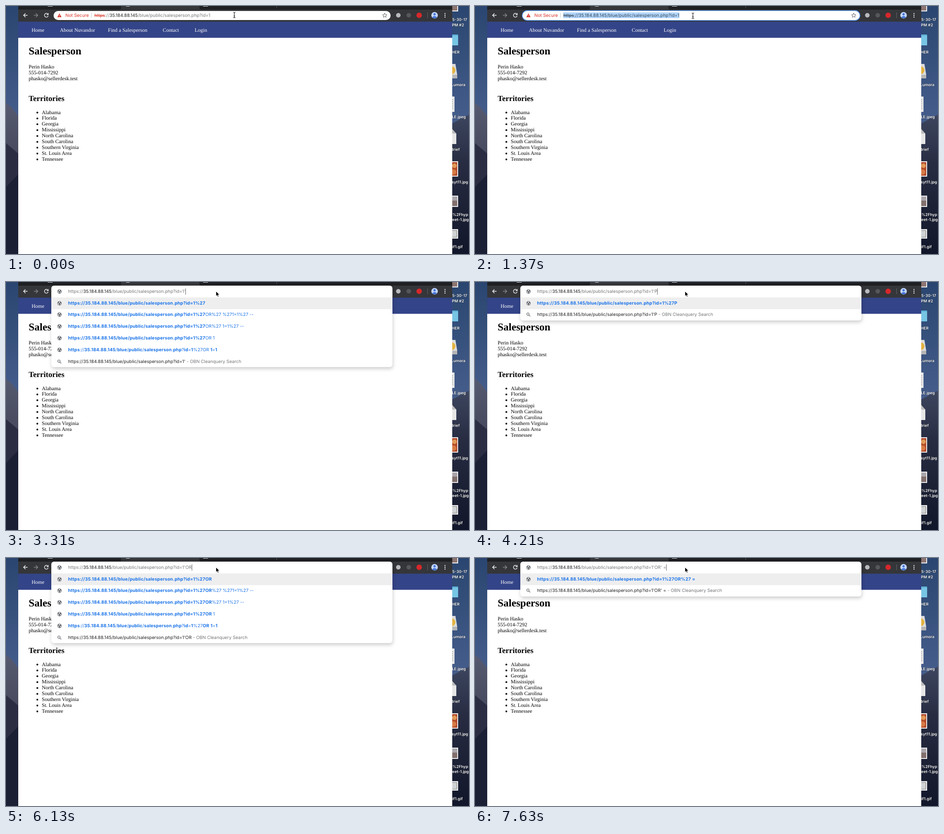
Animation of 1022x548 px, one loop 8000 ms. Source, as an HTML page:

```html
<!DOCTYPE html>
<html lang="en">
<head>
<meta charset="utf-8">
<title>Salesperson lookup</title>
<style>
html, body { margin: 0; width: 100%; height: 100%; overflow: hidden; background: #fff; }
#stage { position: relative; width: 1022px; height: 548px; overflow: hidden; text-rendering: geometricPrecision; }
#stage > svg { position: absolute; left: 0; top: 0; }
.serif { font: 11.5px "Liberation Serif", serif; }
.label { font: 600 8.6px Inter, sans-serif; fill: #fff; text-anchor: end; paint-order: stroke; stroke: #0006; stroke-width: 1px; }
.line { position: absolute; height: 20px; font: 9.86px/20px Inter, sans-serif; white-space: pre; color: #757679; }
.line b { font-weight: 700; letter-spacing: .18px; }
.host { color: #202124; }
.bad { color: #d93025; text-decoration: line-through; }
.caret { border-left: 1px solid #666; margin-right: -1px; padding: 1px 0; }
.caret.off { border-color: transparent; }
#pill { position: absolute; left: 105px; top: 11px; width: 744px; height: 20px; border-radius: 10px; background: #fff; }
#pill.ring { box-shadow: 0 0 0 1.4px #5b9bf3; }
#pill .line { top: -.2px; }
#url.sel { background: linear-gradient(#b3d7ff, #b3d7ff) 0 3px / 100% 13px no-repeat; }
#url.sel, #url.sel * { color: #35424f; }
#drop { position: absolute; left: 100px; top: 8px; width: 753px; border-radius: 6px; background: #fff; box-shadow: 1px 4px 8px #0003; }
#drop .hot { position: absolute; left: 0; top: 25.8px; width: 100%; height: 25.8px; background: #eeeeef; }
#drop .line { left: 37px; color: #1a73e8; }
#drop .line.dark { color: #202124; }
#drop .line.input, #drop i { color: #757679; font-style: normal; }
#drop svg { position: absolute; left: 12px; }
</style>
</head>
<body>
<div id="stage">
<svg id="scene" width="1022" height="548">
  <defs>
    <linearGradient id="sky" x2="0" y2="1">
      <stop stop-color="#2a4670"/><stop offset="1" stop-color="#4a6190"/>
    </linearGradient>
    <linearGradient id="ridge" x2="0" y2="1">
      <stop stop-color="#565a70"/><stop offset="1" stop-color="#44475b"/>
    </linearGradient>
    <linearGradient id="dune" x2="0" y2="1">
      <stop stop-color="#3d465f"/><stop offset=".35" stop-color="#272c42"/><stop offset="1" stop-color="#11162a"/>
    </linearGradient>
    <symbol id="globe" viewBox="-6 -6 12 12">
      <circle r="4.7" fill="#5f6368"/>
      <path d="M-3.8-1.2L-1.6.8-.8 3.8C-3 3-4 1-3.8-1.2ZM-.6-3.8L2-3.2.8-1.4-1-.8-1.6-2.2ZM1 .2L3.6.2 2.6 2.6 1.4 2.8Z" fill="#fff"/>
    </symbol>
    <symbol id="lens" viewBox="-6 -6 12 12">
      <path d="M.9.9L4 4M1.5-1.1a2.6 2.6 0 1 1-5.2 0a2.6 2.6 0 1 1 5.2 0" fill="none" stroke="#5f6368" stroke-width="1.1"/>
    </symbol>
  </defs>
  <rect width="1022" height="300" fill="url(#sky)"/>
  <path d="M0 214L12 224 27 243V350H0Z" fill="url(#ridge)"/>
  <path d="M0 303L27 326V548H0Z" fill="#2b2e43"/>
  <path d="M0 400L27 372V548H0Z" fill="#1c2035"/>
  <path d="M980 262L1022 240V548H980Z" fill="url(#dune)"/>
  <g id="desktop">
    <rect x="975" y="-12" width="23" height="24" fill="#eee"/><rect x="975" y="-12" width="21" height="22" fill="#8d7572"/>
    <rect x="970" y="63" width="28" height="24" rx="1" fill="#5fb4d8"/><rect x="970" y="66" width="28" height="21" fill="#77c5e4"/>
    <path d="M970 128H992L996 152V160H970Z" fill="#dcdcdc"/><rect x="970" y="152" width="26" height="8" fill="#b5b5b5"/>
    <circle cx="983" cy="142" r="9" fill="#e3b341"/>
    <rect x="970" y="200" width="20" height="34" fill="#e9e9e9"/><path d="M986 206V228" stroke="#aaa" stroke-width="2" stroke-dasharray="2 2"/>
    <path d="M970 272H985L994 282V305H970Z" fill="#e6e6e6"/><path d="M985 272V282H994Z" fill="#bbb"/>
    <rect x="970" y="343" width="28" height="34" fill="#eee"/><rect x="970" y="345" width="26" height="30" fill="#b34a2a"/>
    <circle cx="990" cy="353" r="5" fill="#e09a58"/><circle cx="988" cy="367" r="6" fill="#d77b46"/>
    <rect x="970" y="419" width="28" height="25" fill="#eee"/><rect x="970" y="421" width="26" height="21" fill="#82706e"/><rect x="970" y="421" width="26" height="9" fill="#a9a5ab"/>
    <rect x="970" y="493" width="28" height="21" fill="#eee"/><rect x="970" y="496" width="25" height="15" fill="#d0d2d4" stroke="#777"/>
  </g>
  <rect x="27" width="958" height="548" fill="#fff"/>
  <rect x="27" width="958" height="9" fill="#1f2023"/>
  <path d="M250 8Q254 8 254 4V0H427V4Q427 8 431 8Z" fill="#35363a"/>
  <path d="M597.5 0V4" stroke="#4b4c50"/>
  <path d="M92 .5H103M265 .5H273M435 .5H446" stroke="#ddd"/>
  <rect x="27" y="8" width="958" height="27" fill="#35363a"/>
  <rect x="27" y="34.600" width="958" height="35.700" fill="#334488"/>
  <g fill="none" stroke="#f1f3f4" stroke-width="1.4">
    <path d="M47.5 20.5H39M43 16.3L38.8 20.5 43 24.7"/>
    <path d="M61.5 20.5H70M66 16.3L70.2 20.5 66 24.7" stroke="#85868a"/>
    <path d="M92.2 17.6A4.2 4.2 0 1 0 93.1 21.7M93.2 15.8V19.3H89.7"/>
  </g>
  <circle cx="866" cy="20.5" r="5" fill="#b9babd"/>
  <circle cx="889" cy="20.5" r="5" fill="#55575a"/>
  <circle cx="912" cy="20.5" r="6" fill="#d6282b"/>
  <path d="M930.5 14V27" stroke="#606266"/>
  <circle cx="946" cy="20.5" r="7.2" fill="#c3d6fb"/>
  <circle cx="946" cy="18.2" r="2.5" fill="#4272d7"/><path d="M940.8 25Q946 19.5 951.2 25Q946 29.5 940.8 25Z" fill="#4272d7"/>
  <g fill="#f1f3f4"><circle cx="969" cy="16.6" r="1.2"/><circle cx="969" cy="20.5" r="1.2"/><circle cx="969" cy="24.4" r="1.2"/></g>
</svg>
<div id="pill">
  <svg width="744" height="20">
    <path d="M13 5.3L17.6 13.8H8.4Z" fill="#d93025"/><path d="M13 8.3V11M13 11.8V12.9" stroke="#fff"/>
    <path d="M83.5 4V15" stroke="#c8cacd"/>
    <path d="M731 4.7L732.4 8 736 8.3 733.3 10.6 734.1 14.1 731 12.2 727.9 14.1 728.7 10.6 726 8.3 729.6 8Z" fill="none" stroke="#5f6368"/>
  </svg>
  <span class="line" style="left:26px;color:#d93025">Not Secure</span>
  <span class="line" id="url" style="left:90px"></span>
</div>
<div id="drop"></div>
<svg width="1022" height="548">
  <g id="beam" fill="none">
    <path d="M-2.5-6Q0-6 0-4.5Q0-6 2.5-6M0-4.5V4.5M-2.5 6Q0 6 0 4.5Q0 6 2.5 6M-1.5 2H1.5" stroke="#fff" stroke-width="2.4" opacity=".7"/>
    <path d="M-2.5-6Q0-6 0-4.5Q0-6 2.5-6M0-4.5V4.5M-2.5 6Q0 6 0 4.5Q0 6 2.5 6M-1.5 2H1.5" stroke="#111" stroke-width="1.1"/>
  </g>
  <path id="arrow" d="M463.5 20.5V31.3L466 29 467.6 32.8 469.5 32 467.9 28.3H471.3Z" fill="#000" stroke="#fff" stroke-width=".8"/>
</svg>
</div>
<script>
const $ = id => document.getElementById(id);

function addText(x, y, text, cls = 'serif', style = '') {
  const el = document.createElementNS('http://www.w3.org/2000/svg', 'text');
  el.setAttribute('x', x);
  el.setAttribute('y', y);
  el.setAttribute('class', cls);
  el.style.cssText = style;
  el.textContent = text;
  (cls === 'label' ? $('desktop') : $('scene')).append(el);
}

[[56.5, 'Home'], [119, 'About Nuvandor'], [225, 'Find a Salesperson'], [346, 'Contact'], [416.5, 'Login']]
  .forEach(([x, text]) => addText(x, 57, text, 'serif', 'fill:#fff'));
addText(50, 106.5, 'Salesperson', 'serif', 'font-size:23px;font-weight:bold');
addText(50, 209.5, 'Territories', 'serif', 'font-size:17.25px;font-weight:bold');
['Perin Hasko', '555-014-7292', 'phasko@sellerdesk.test']
  .forEach((text, i) => addText(50, 138 + i * 12.95, text));
['Alabama', 'Florida', 'Georgia', 'Mississippi', 'North Carolina', 'South Carolina',
 'Southern Virginia', 'St. Louis Area', 'Tennessee'].forEach((text, i) => {
  const y = 238.5 + i * 12.93;
  addText(79, y, text);
  $('scene').insertAdjacentHTML('beforeend', `<circle cx="69.2" cy="${y - 3}" r="2"/>`);
});
[[1018, 33, '5-30-17'], [1011, 44.5, 'PM #2'], [1001, 104.5, 'HER'], [1014, 176.5, 'Lumora'],
 [1015, 248, 'LE.jpeg'], [1001.5, 320, 'Brief'], [1020, 391.5, 'syt11.jpg'],
 [1020, 463.5, '%2Fhyp'], [1021.5, 475, 'eet-1.jpg'], [1008, 535, 'if1.gif']]
  .forEach(([x, y, text]) => addText(x, y, text, 'label'));

const HOST = '35.184.88.145', PATH = '/blue/public/salesperson.php?id=1';
const PAGE = 'https://' + HOST + PATH;
const HISTORY = ['%27OR%27 %271=1%27 --', '%27OR%27 1=1%27 --', '%27OR 1'];
const WORDS = '%27OR 1=1';
const ROW = 25.8;

const bold = text => `<b>${text}</b>`;
const boldWords = text => text.replace(/[\d.]{6,}|\w+/g, bold);
const caretTag = on => `<span class="caret${on ? '' : ' off'}"></span>`;

function suggestions(query) {
  const typed = query.replaceAll("'", '%27');
  const rows = [bold(PAGE + typed)];
  for (const past of HISTORY)
    if (past.startsWith(typed)) rows.push(bold(PAGE + typed) + past.slice(typed.length));
  if (WORDS.startsWith(typed)) {
    const letters = typed.slice(3);
    rows.push(boldWords(PAGE) + '%27' + (letters && bold(letters)) +
      WORDS.slice(typed.length).replace(/1/g, bold));
  }
  return rows;
}

function dropdown({ typed, list, caret }) {
  const rows = suggestions(list);
  const line = (i, icon, cls, html) => {
    const mid = 12.8 + i * ROW;
    return `<svg width="12" height="12" style="top:${mid - 6}px"><use href="#${icon}"/></svg>` +
      `<div class="line ${cls}" style="top:${mid - 10}px">${html}</div>`;
  };
  $('drop').style.height = (rows.length + 2) * ROW - .2 + 'px';
  $('drop').innerHTML = '<div class="hot"></div>' +
    line(0, 'globe', 'input', `https://<span class="host">${HOST}</span>${PATH}${typed}${caretTag(caret)}`) +
    rows.map((html, i) => line(i + 1, 'globe', '', html)).join('') +
    line(rows.length + 1, 'lens', 'dark', `${PAGE}${list}<i> - OBN Cleanquery Search</i>`);
}

// Each step changes part of the state from its time (ms) on.
const STEPS = [
  [0, { at: [504, 20], ring: false, sel: false, caret: false, typed: '', list: '' }],
  [140, { at: [503, 22] }],
  [290, { at: [497, 27] }],
  [440, { at: [489, 28] }],
  [590, { at: [484, 26] }],
  [780, { at: [481, 22], ring: true }],
  [930, { at: [480, 21] }],
  [1230, { sel: true }],
  [1370, { at: [481, 21.5] }],
  [1670, { at: [470, 22] }],
  [1820, { at: [464, 22] }],
  [2120, { sel: false, caret: true }],
  [2560, { caret: false }],
  [3010, { caret: true }],
  [3310, { typed: "'", list: "'" }],
  [3760, { caret: false }],
  [4060, { typed: "'P", caret: true }],
  [4210, { list: "'P" }],
  [4500, { typed: "'" }],
  [4640, { list: "'" }],
  [4940, { typed: "'O", list: "'O" }],
  [5230, { typed: "'OR", list: "'OR" }],
  [5680, { caret: false }],
  [6130, { caret: true }],
  [6430, { typed: "'OR'", list: "'OR'" }],
  [6880, { caret: false }],
  [7030, { typed: "'OR' ", caret: true }],
  [7630, { typed: "'OR' =", list: "'OR' =" }],
];
const LOOP = 8000;

function render(state) {
  const open = state.typed !== '';
  $('pill').classList.toggle('ring', state.ring);
  $('url').classList.toggle('sel', state.sel);
  $('url').innerHTML = `<span class="bad">https</span>://<span class="host">${HOST}</span>${PATH}${caretTag(state.caret)}`;
  $('drop').style.display = $('arrow').style.display = open ? '' : 'none';
  $('beam').style.display = open ? 'none' : '';
  $('beam').setAttribute('transform', `translate(${state.at})`);
  if (open) dropdown(state);
}

let shown = 0;
function tick() {
  const time = performance.now() % LOOP;
  const past = STEPS.filter(([start]) => start <= time);
  if (past.length !== shown) {
    shown = past.length;
    render(Object.assign({}, ...past.map(step => step[1])));
  }
  requestAnimationFrame(tick);
}
tick();
</script>
</body>
</html>
```
